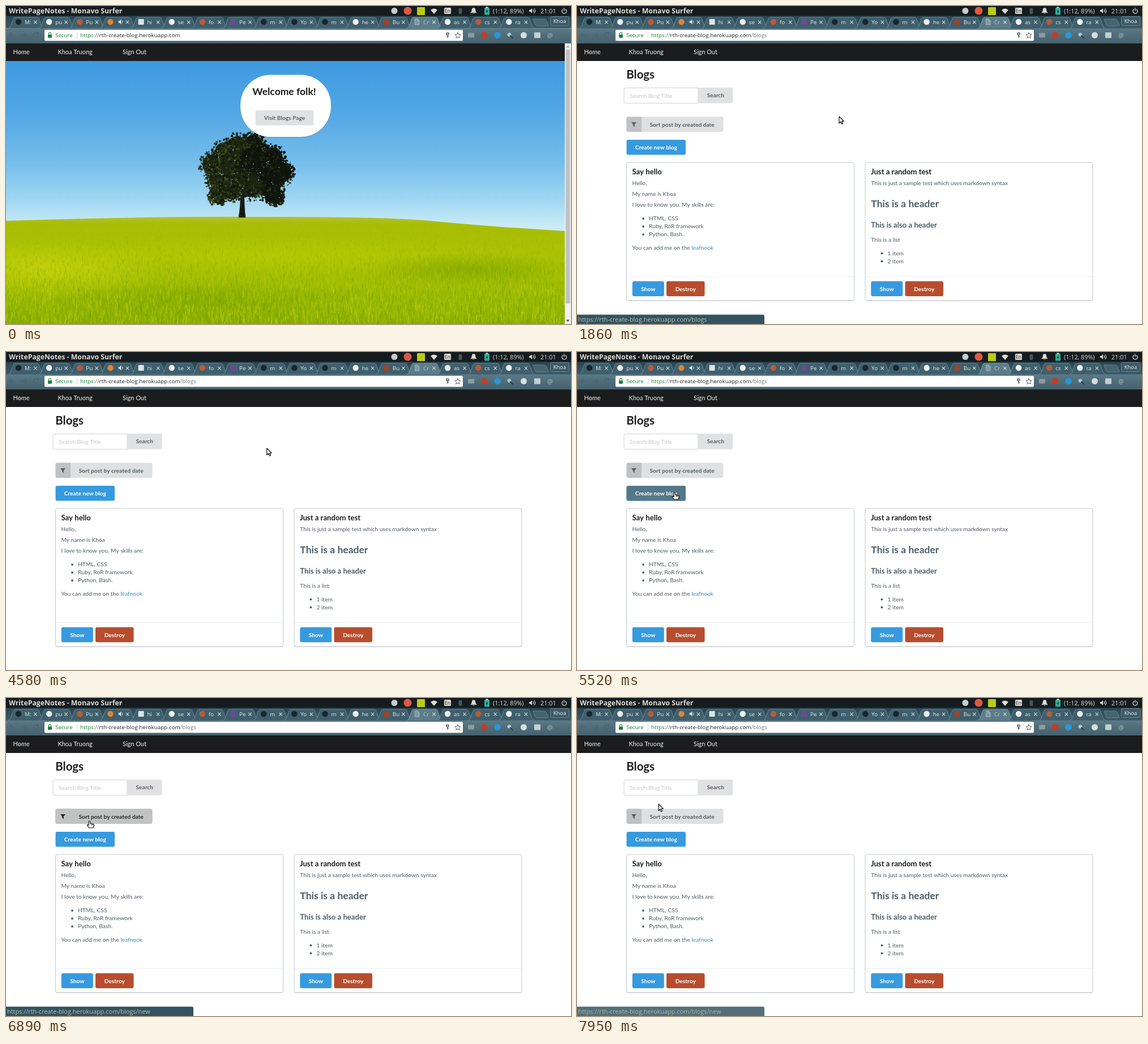
These frames come from a looping animation (998 px wide and 561 px high, 8 s). An HTML page with a canvas:

```html
<!DOCTYPE html>
<html lang="en">
<head>
<meta charset="utf-8">
<title>Blog demo</title>
<style>
html, body { margin: 0; width: 100%; height: 100%; overflow: hidden; background: #fff; }
canvas { display: block; width: 998px; height: 561px; }
</style>
</head>
<body>
<canvas id="stage" width="998" height="561"></canvas>
<script>
const W = 998, H = 561, LOOP = 8000;
const stage = document.getElementById('stage').getContext('2d');
let c = stage;

const UI = '"Open Sans", "Noto Sans", sans-serif';
const PAGE = 'Lato, sans-serif';
const clamp = v => Math.max(0, Math.min(1, v));
const ease = v => v * v * (3 - 2 * v);

// Seeded random numbers
let seed = 7;
const rnd = (a = 0, b = 1) => {
  seed = (seed * 16807) % 2147483647;
  return a + (b - a) * seed / 2147483647;
};

// Drawing helpers
function layer(draw) {
  const cv = document.createElement('canvas');
  cv.width = W;
  cv.height = H;
  c = cv.getContext('2d');
  draw();
  c = stage;
  return cv;
}
function rect(x, y, w, h, fill, r = 0, line) {
  c.beginPath();
  c.roundRect(x, y, w, h, r);
  if (fill) { c.fillStyle = fill; c.fill(); }
  if (line) { c.strokeStyle = line; c.lineWidth = 1; c.stroke(); }
}
function dot(x, y, r, fill) {
  c.beginPath();
  c.arc(x, y, r, 0, 7);
  c.fillStyle = fill;
  c.fill();
}
function shape(d, x, y, fill, line, width = 1) {
  const p = new Path2D(d);
  c.save();
  c.translate(x, y);
  c.lineWidth = width;
  c.lineJoin = c.lineCap = 'round';
  if (fill) { c.fillStyle = fill; c.fill(p); }
  if (line) { c.strokeStyle = line; c.stroke(p); }
  c.restore();
}
function text(s, x, y, size, fill, font = PAGE, weight = 400, align = 'left') {
  c.font = `${weight} ${size}px ${font}`;
  c.textAlign = align;
  c.fillStyle = fill;
  c.fillText(s, x, y);
  return x + c.measureText(s).width;
}
function gradient(y0, y1, ...stops) {
  const g = c.createLinearGradient(0, y0, 0, y1);
  stops.forEach(([at, col]) => g.addColorStop(at, col));
  return g;
}
function button(x, y, w, label, bg, fg, h = 26.4) {
  rect(x, y, w, h, bg, 3);
  text(label, x + w / 2, y + h / 2 + 3.7, 10.23, fg, PAGE, 700, 'center');
}
function withAlpha(a, draw) {
  if (a <= 0) return;
  c.save();
  c.globalAlpha = a;
  draw();
  c.restore();
}

// Browser and desktop
const DARK = '#18262d', WHITE = '#eef2f3', ORANGE = '#bd5a38';
const TABS = [
  ['M:', DARK], ['pu', WHITE], ['Pu', ORANGE], ['', '#df8435'], ['hi', '#dbe5ea', 1], ['se', WHITE],
  ['fo', ORANGE], ['Pe', '#6b4a94', 1], ['m', DARK], ['Yo', DARK], ['m', DARK], ['he', WHITE],
  ['Bu', '#9c4428', 1], ['Cr', null], ['as', WHITE], ['cs', ORANGE], ['ra', WHITE]
];
const SPEAKER = 'M-4-1.5h2l3-3v9l-3-3h-2z';

function drawTabs() {
  rect(0, 17, W, 22.5, gradient(17, 39, [0, '#294550'], [1, '#3a5a68']));
  TABS.forEach(([title, color, square], i) => {
    const x = 22 + i * 54.15, active = i === 13;
    shape('M-18 21.5Q-15 21-14 18L-9 4Q-8 2-6 2H33Q35 2 36 4L41 18Q42 21 45 21.5', x, 18,
      active ? '#5d7c89' : '#3f5f6d', active ? '#8fa6b0' : '#7691a0', 0.8);
    if (active) shape('M-3-5h4l3 3v7h-7zM1-5v3h3', x, 28, '#7d98a4', '#b9c7cd', 0.8);
    else if (square) rect(x - 5, 23, 10, 10, color, 1);
    else dot(x, 28, 5.2, color);
    text(title, x + 11, 32, 9.8, active ? '#b7c7cd' : '#e6ecee', UI);
    if (i === 3) {
      shape(SPEAKER, x + 18, 28, '#dbe4e8');
      shape('M3-2q2 2 0 4', x + 18, 28, null, '#dbe4e8');
    }
    shape('M-2.3-2.3l4.6 4.6M2.3-2.3l-4.6 4.6', x + 30, 28.5, null, '#cfdade', 1.2);
  });
  shape('M0 0H20Q22 0 23 2L27 11Q27 12 26 12H7Q5 12 4 10L0 1z', 931, 23, '#46646f', '#718b97', 0.8);
  rect(961.5, 18.5, 33, 16, '#3d5a67', 2, '#6b8592');
  text('Khoa', 978, 30, 9.4, '#f0f3f4', UI, 400, 'center');
}

function drawToolbar() {
  rect(0, 39.5, W, 26.5, gradient(39, 66, [0, '#5b7a87'], [0.5, '#4f6d79'], [1, '#46626e']));
  shape('M5 0h-9m4-4l-4 4 4 4M18 0h9m-4-4l4 4-4 4', 10, 51.5, null, '#48656f', 1.5);
  shape('M4-2a4.5 4.5 0 1 0 0 4M4-5v3h-3', 53, 51.5, null, '#48656f', 1.5);
  rect(68, 42, 739, 19.5, '#fff', 2);
  rect(74, 50.5, 7, 5.5, '#188038', 1);
  shape('M-2 0v-2a2 2 0 0 1 4 0v2', 77.5, 50.5, null, '#188038', 1.2);
  text('Secure', 87, 55, 9.8, '#188038', UI);
  rect(125, 46, 1, 11, '#d0d4d5');
  shape('M-2-4h4v3h-4zM0-1v5M0 2h1.5', 780, 51.5, null, '#565d61', 1.4);
  shape('M0-5l1.5 3.3 3.6.4-2.7 2.4.8 3.6L0 2.9l-3.2 1.8.8-3.6-2.7-2.4 3.6-.4z', 798, 51.8, null, '#565d61');
  rect(816, 47.5, 11, 8, '#8d9b9f', 1);
  dot(844.5, 51.5, 5.7, '#c63a28');
  dot(868, 51.5, 5.7, '#2a96d8');
  dot(889, 50.5, 3.3, '#a8c9de');
  shape('M2 2l4 4', 889, 50.5, null, '#263f55', 2);
  dot(914.5, 51.5, 5.5, '#d8dcdd');
  rect(933, 46.5, 11, 10, '#c5cfd2', 1);
  text('@', 961, 55.5, 11, '#b5c3c8', UI, 400, 'center');
}

function drawPanel() {
  rect(0, 0, W, 17.5, '#151c20');
  text('WritePageNotes - Monavo Surfer', 5, 13, 12.3, '#dfdbd2', UI, 700);
  dot(686, 8.5, 5.5, '#c5cccf');
  dot(709.5, 8.5, 7, '#dc5a43');
  rect(726, 2, 14, 14, '#b9cd12', 1);
  shape('M-6-2Q0-7 6-2L0 5z', 756, 9, '#dfdbd2');
  rect(774, 3, 12, 11, '#dfdbd2', 1.5);
  text('En', 780, 12, 8.5, '#20272a', UI, 400, 'center');
  rect(799.5, 4, 6, 10, '#47555b', 2);
  shape('M-5 3Q-3 2-3-1Q-3-5 0-5Q3-5 3-1Q3 2 5 3zM-1 4.5h2', 826, 8.5, '#dfdbd2', '#dfdbd2', 0.7);
  rect(845, 3, 9, 12.5, '#2fae98', 1);
  rect(847.5, 1.5, 4, 2, '#dfdbd2');
  shape('M1-4l-3 5h2l-1 3 3-5h-2z', 849.5, 9.5, '#151c20');
  text('(1:12, 89%)', 860, 12.6, 10.8, '#dfdbd2', UI);
  shape(SPEAKER, 928, 8.5, '#dfdbd2');
  shape('M3-2q2 2 0 4M5-4q3.5 4 0 8', 928, 8.5, null, '#dfdbd2', 1.1);
  text('21:01', 944, 12.6, 10.9, '#dfdbd2', UI);
  shape('M-2.5-3a4 4 0 1 0 5 0M0-5v4', 986, 9, null, '#dfdbd2', 1.3);
}

function drawBrowser(onBlogs) {
  drawTabs();
  drawToolbar();
  drawPanel();
  let x = text('https', 131, 55, 9.83, '#188038', UI);
  x = text('://', x, 55, 9.83, '#6b7478', UI);
  x = text('rth-create-blog.herokuapp.com', x, 55, 9.83, '#20272a', UI);
  if (onBlogs) text('/blogs', x, 55, 9.83, '#72797c', UI);
  rect(0, 66, onBlogs ? W : 987, 31, '#1b1c1d');
  text('Home', 12.5, 85.2, 10.96, '#f0f0f0');
  text('Khoa Truong', 91.5, 85.2, 10.96, '#f0f0f0');
  text('Sign Out', 206, 85.2, 10.96, '#f0f0f0');
}

// Landscape
const HORIZON = 'M0 379C140 375 290 371 430 372C560 372 680 372 760 380C840 388 910 392 987 397V561H0Z';

function glow(x, y, rx, ry, rgb) {
  c.save();
  c.translate(x, y);
  c.scale(rx, ry);
  const g = c.createRadialGradient(0, 0, 0, 0, 0, 1);
  g.addColorStop(0, `rgba(${rgb},.75)`);
  g.addColorStop(1, `rgba(${rgb},0)`);
  dot(0, 0, 1, g);
  c.restore();
}

function drawTree() {
  shape('M-5 30Q-1 10-2-30L-30-50M2-25L24-52M-3 30H5Q2 12 3-30', 417, 342, null, '#18170d', 2.5);
  shape('M-5 30Q-1 10-2-28H3Q2 12 5 30z', 418, 342, '#18170d');
  const crown = [
    [437, 244, 21], [408, 247, 22], [385, 256, 20], [365, 280, 23], [378, 306, 25], [374, 335, 17],
    [405, 280, 34], [440, 277, 36], [470, 268, 24], [486, 294, 23], [463, 313, 30], [475, 337, 16],
    [430, 315, 28], [401, 327, 18]
  ];
  const leaves = ['#10150c', '#171e0f', '#202a12', '#2f3b18', '#40501f'];
  for (const [x, y, r] of crown) {
    dot(x, y, r * 0.78, x > 435 ? '#10140c' : '#1d2611');
    for (let i = 0; i < 190; i++) {
      const a = rnd(0, 6.283), d = r * Math.sqrt(rnd()) * 1.08;
      const lx = x + Math.cos(a) * d, ly = y + Math.sin(a) * d;
      const lit = rnd(0, 5) - clamp((lx - 395) / 90) * 2.2;
      dot(lx, ly, rnd(0.7, 2.4), leaves[Math.max(0, Math.floor(lit))]);
    }
  }
  for (let i = 0; i < 55; i++) dot(rnd(352, 500), rnd(248, 347), rnd(0.5, 1.2), '#7da7b6');
}

function drawGrass() {
  c.save();
  c.clip(new Path2D(HORIZON));
  rect(0, 365, 987, 196, gradient(372, 561,
    [0, '#b2c12c'], [0.07, '#a7bd05'], [0.4, '#abc204'], [0.7, '#9cbb02'], [1, '#87ad03']));
  glow(75, 465, 210, 52, '205,214,14');
  glow(480, 440, 420, 32, '183,203,4');
  glow(820, 465, 190, 30, '128,166,0');
  glow(340, 520, 280, 36, '125,166,0');
  glow(750, 535, 290, 26, '155,188,4');
  const tints = ['#6e9a00', '#7ea600', '#94b500', '#b6ca05', '#c9d61e', '#a4bf00'];
  c.lineCap = 'round';
  for (let i = 0; i < 10500; i++) {
    const depth = Math.pow(rnd(), 0.75), x = rnd(0, 987), y = 377 + depth * 187;
    const len = rnd(1, 3) + depth * rnd(4, 13);
    c.globalAlpha = rnd(0.12, 0.2) + depth * 0.28;
    c.strokeStyle = tints[Math.floor(rnd(0, 6))];
    c.lineWidth = 0.5 + depth * 1.1;
    c.beginPath();
    c.moveTo(x, y);
    c.lineTo(x + rnd(-2.5, 2.5) * depth, y - len);
    c.stroke();
  }
  c.restore();
}

function drawWelcome() {
  rect(0, 97, 987, 310, gradient(97, 390,
    [0, '#3e9adf'], [0.3, '#51a6e4'], [0.6, '#74bdec'], [0.82, '#9cd5f2'], [1, '#cbecf5']));
  drawGrass();
  drawTree();
  rect(414, 122, 160, 110, 'rgba(30,70,90,.35)', 53);
  rect(414, 121.5, 160, 109.5, '#fff', 53);
  text('Welcome folk!', 491.5, 157, 17.5, '#1b1c1d', PAGE, 700, 'center');
  button(440.5, 184, 103, 'Visit Blogs Page', '#e0e1e2', '#5f6162');
  rect(987, 66, 11, 495, '#f1f1f1');
  rect(988.5, 77, 8, 448, '#c1c1c1');
  shape('M-3 2L0-2 3 2z', 992.5, 71.5, '#a3a3a3');
  shape('M-3-2L0 2 3-2z', 992.5, 555.5, '#505050');
  drawBrowser(false);
}

// Blog list
const INK = '#505c61', HEAD = '#1b1c1d', BLUE = '#379adf', RED = '#b74d2e';
const FUNNEL = 'M-4.5-4H4.5L1.3 0V4.5L-1.3 2.5V0z';

function sortButton(bg, side, ink) {
  rect(87.5, 195.6, 171, 26.4, bg, 3);
  rect(87.5, 195.6, 26.5, 26.4, side, [3, 0, 0, 3]);
  shape(FUNNEL, 100.5, 209, ink);
  text('Sort post by created date', 128.5, 212.6, 10.23, ink, PAGE, 700);
}
function bullets(x, y, items) {
  items.forEach((s, i) => {
    dot(x - 10, y + i * 14 - 3.4, 1.9, INK);
    text(s, x, y + i * 14, 10.23, INK);
  });
}
function card(x, title) {
  rect(x, 277, 402, 243.5, 'rgba(60,80,90,.25)', 3);
  rect(x, 276, 402, 243.5, '#fff', 3, '#c3c9cc');
  rect(x + 1, 477, 400, 1, '#eceeef');
  text(title, x + 10, 296.6, 13.15, HEAD, PAGE, 700);
  button(x + 10.3, 485.6, 56, 'Show', BLUE, '#fff');
  button(x + 70.5, 485.6, 67.5, 'Destroy', RED, '#fff');
}

function drawBlogs() {
  rect(0, 66, W, H, '#fff');
  drawBrowser(true);
  text('Blogs', 87.3, 128, 20.46, HEAD, PAGE, 700);
  rect(83, 144.5, 131, 27, '#fff', [3, 0, 0, 3], '#cfd4d6');
  text('Search Blog Title', 93, 162.3, 10.23, '#c6c8c9');
  button(214, 144, 61.5, 'Search', '#e0e1e2', '#5b6063', 27.5);
  sortButton('#dfe0e1', '#bfc1c2', '#565d60');
  button(87.5, 236, 104.5, 'Create new blog', BLUE, '#fff');

  card(87.5, 'Say hello');
  ['Hello,', 'My name is Khoa', 'I love to know you. My skills are:']
    .forEach((s, i) => text(s, 97.5, 316.4 + i * 19, 10.23, INK));
  bullets(127, 378.4, ['HTML, CSS', 'Ruby, RoR framework', 'Python, Bash.']);
  const x = text('You can add me on the ', 97.5, 430.2, 10.23, INK);
  text('leafnook', x, 430.2, 10.23, '#3b8fcc');

  card(509, 'Just a random test');
  text('This is just a sample test which uses markdown syntax', 519.3, 316.4, 10.23, INK);
  text('This is a header', 519.3, 354.8, 17.5, '#4d5f68', PAGE, 700);
  text('This is also a header', 519.3, 390.6, 13.15, '#4d5f68', PAGE, 700);
  text('This is a list', 519.3, 415.6, 10.23, INK);
  bullets(548.5, 439.8, ['1 item', '2 item']);
}

// Time line
const PATH = [
  [460, 478, 196], [730, 463, 193], [1810, 463, 193], [1860, 463, 195], [2490, 463, 195],
  [2790, 467, 156], [2970, 468.5, 167], [4540, 468.5, 167], [4820, 335, 216], [5120, 215, 264],
  [5340, 189, 249], [5500, 172.5, 248], [5700, 172, 248], [5930, 152, 247], [6500, 152, 247],
  [6700, 148, 241], [6890, 147.5, 217], [7000, 147, 217], [7200, 150, 244], [7520, 150, 244],
  [7730, 148, 210], [7950, 144, 187]
];
function pointer(t) {
  const i = PATH.findIndex(p => p[0] > t);
  if (i < 0) return PATH[PATH.length - 1].slice(1);
  const [t0, x0, y0] = PATH[i - 1], [t1, x1, y1] = PATH[i];
  const k = ease((t - t0) / (t1 - t0));
  return [x0 + (x1 - x0) * k, y0 + (y1 - y0) * k];
}
// Strength of a state that fades in and out at each [start, end]
const fade = (t, spans, inMs = 90, outMs = 90) => Math.max(...spans.map(([a, b]) =>
  Math.min(clamp((t - a) / inMs), 1 - clamp((t - b) / outMs))));

function drawPointer(t) {
  const [x, y] = pointer(t);
  const over = (l, r, a, b) => x > l && x < r && y > a && y < b;
  const hand = t < 1860 || over(87, 192, 236, 262) || over(87, 258, 195, 222);
  if (hand) {
    shape('M-1.4 1Q0-1 1.4 1V4.5L7 5.6Q8 6 7.8 8L6.5 12H-1L-4 8Q-4.6 6.4-3 6.4L-1.4 7.5z', x, y, '#fff', '#111', 1.2);
    shape('M3.2 5.5v2M5.4 5.8v2', x, y, null, '#111', 0.8);
  } else {
    shape('M0 0V11.8L2.8 9.2 4.7 13.4 6.7 12.5 4.8 8.4H8.4z', x, y, '#fff', '#111', 1.2);
  }
}

function drawStatus(t) {
  const a = fade(t, [[870, 2490], [6090, 6950], [7250, 7910]], 100, 250);
  withAlpha(a, () => {
    rect(0, 544.5, 331, 17, '#335361', [0, 3, 0, 0]);
    text('https://rth-create-blog.herokuapp.com/blogs' + (t > 5000 ? '/new' : ''),
      2, 556.5, 10.93, '#b9c6ab', UI);
  });
}

let welcome, blogs;
function build() {
  seed = 7;
  welcome = layer(drawWelcome);
  blogs = layer(drawBlogs);
}

function render(t) {
  if (t < 1860) {
    c.drawImage(welcome, 0, 0);
    withAlpha(fade(t, [[460, 1900]]), () =>
      button(440.5, 184, 103, 'Visit Blogs Page', '#a6aaab', '#1b1c1d'));
  } else {
    c.drawImage(blogs, 0, 0);
    withAlpha(fade(t, [[5390, 6740], [7090, 7580]]), () =>
      button(87.5, 236, 104.5, 'Create new blog', '#557889', '#fff'));
    withAlpha(fade(t, [[6790, 7060], [7650, 7820]]), () =>
      sortButton('#c1c2c2', '#c1c2c2', '#272a2b'));
  }
  drawStatus(t);
  if (t >= 460) drawPointer(t);
}

build();
const start = performance.now();
function tick() {
  render((performance.now() - start) % LOOP);
  requestAnimationFrame(tick);
}
requestAnimationFrame(tick);
</script>
</body>
</html>
```
